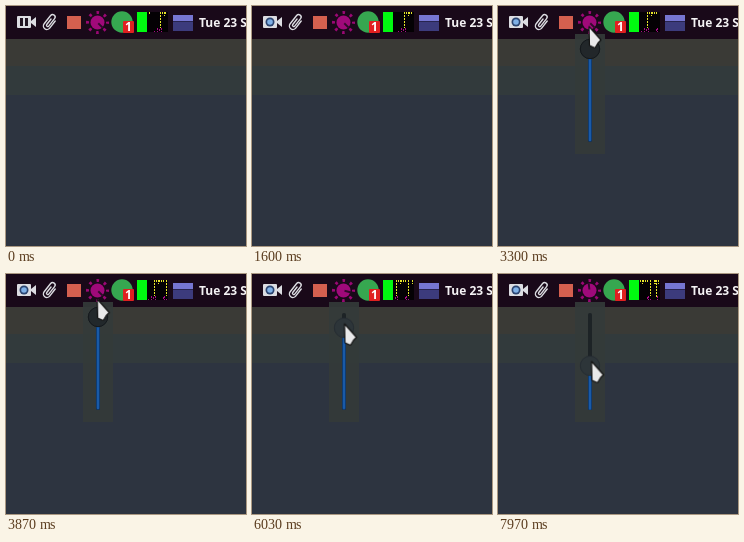
These frames come from a looping animation (240x240 px, 8000 ms). An HTML page:

```html
<!DOCTYPE html>
<html lang="en">
<head>
<meta charset="utf-8">
<title>Panel brightness slider</title>
<style>
html, body { margin: 0; width: 100%; height: 100%; overflow: hidden; background: #2d3440; }
svg { display: block; width: 100vw; height: 100vh; }
.cursor, .knob, .fill, .popup, .paused, .lens, .needle, .idle, .hover { animation: 8s linear infinite; }
.clock { font: 700 12px "Open Sans", sans-serif; fill: #f4f2f4; }
.badge { font: 700 12px "Open Sans", sans-serif; fill: #fff; text-anchor: middle; }

.paused { animation-name: paused; animation-timing-function: step-end; }
@keyframes paused { 0% { opacity: 1 } .375%, 100% { opacity: 0 } }
.lens { animation-name: lens; animation-timing-function: step-end; }
@keyframes lens { 0% { opacity: 0 } .375%, 100% { opacity: 1 } }

.cursor { animation-name: cursor; }
@keyframes cursor {
  0%, 22.1% { transform: translate(5px, 90px); opacity: 0; }
  22.11% { transform: translate(5px, 90px); opacity: 1; animation-timing-function: ease-out; }
  27.125% { transform: translate(88.5px, 51.5px); opacity: 1; animation-timing-function: ease-in-out; }
  30% { transform: translate(90px, 26px); }
  32.875%, 45% { transform: translate(91px, 20.5px); animation-timing-function: ease-in-out; }
  55%, 59.1% { transform: translate(92px, 39.5px); }
  60.4%, 62.5% { transform: translate(92px, 39px); }
  72.5% { transform: translate(92.5px, 47px); }
  82.875% { transform: translate(92.5px, 57px); }
  86.625% { transform: translate(93.5px, 65px); }
  93.375% { transform: translate(93.5px, 84px); }
  100% { transform: translate(93.5px, 87.5px); opacity: 1; }
}

.popup { animation-name: popup; }
@keyframes popup { 0%, 34.6% { opacity: 0 } 37%, 100% { opacity: 1 } }

.knob { animation-name: knob; }
@keyframes knob {
  0%, 62.5% { transform: translateY(43px); }
  72.5% { transform: translateY(51px); }
  82.875% { transform: translateY(61px); }
  86.625% { transform: translateY(69px); }
  93.375% { transform: translateY(88px); }
  100% { transform: translateY(92px); }
}
.fill { animation-name: fill; transform-origin: 0 136px; }
@keyframes fill {
  0%, 62.5% { transform: scaleY(1); }
  72.5% { transform: scaleY(.914); }
  82.875% { transform: scaleY(.806); }
  86.625% { transform: scaleY(.72); }
  93.375% { transform: scaleY(.516); }
  100% { transform: scaleY(.473); }
}
.needle { animation-name: needle; }
@keyframes needle {
  0%, 62.5% { transform: rotate(135deg); }
  72.5% { transform: rotate(112deg); }
  82.875% { transform: rotate(83deg); }
  86.625% { transform: rotate(59deg); }
  93.375% { transform: rotate(4deg); }
  100% { transform: rotate(-7deg); }
}
.idle { animation-name: idle; }
@keyframes idle { 0%, 48% { opacity: 1 } 54%, 100% { opacity: 0 } }
.hover { animation-name: hover; }
@keyframes hover { 0%, 62.5% { fill: #323a3c } 66%, 100% { fill: #2d3539 } }
</style>
</head>
<body>
<svg viewBox="0 0 240 240" preserveAspectRatio="none">
  <path d="M0 0H240V240H0Z" fill="#2d3440"/>
  <path d="M0 33H240V60H0Z" fill="#3a3a36"/>
  <path d="M0 60H240V89H0Z" fill="#323a3c"/>
  <path d="M0 0H240V33H0Z" fill="#190919"/>

  <!-- camera -->
  <path d="M25 15L30 11V21L25 17Z" fill="#dcdde2"/>
  <rect x="11" y="10" width="14" height="12" rx="1" fill="#dcdde2"/>
  <path class="paused" d="M14 12H17V20H14ZM19 12H22V20H19Z" fill="#211522"/>
  <g class="lens">
    <circle cx="18" cy="16" r="4.5" fill="#2b4470"/>
    <circle cx="18" cy="16" r="2.8" fill="#7fb0e6"/>
  </g>

  <!-- paper clip -->
  <path transform="translate(44 16) rotate(38)" fill="none" stroke="#dcdde2" stroke-width="1.4" stroke-linecap="round"
    d="M3.5-4V5A3.5 3.5 0 0 1-3.5 5V-5.5A2.5 2.5 0 0 1 1.5-5.5V4A1 1 0 0 1-1 4V-3"/>

  <rect x="61" y="10" width="14" height="13" fill="#d4604f"/>

  <!-- brightness dial, its needle follows the slider -->
  <g transform="translate(91.5 16.5)">
    <circle r="10" fill="none" stroke="#9a0874" stroke-width="3" stroke-dasharray="2.6 5.254" stroke-dashoffset="1.3"/>
    <circle r="7" fill="#a0097a"/>
    <path class="needle" d="M-1-7.2H1L.8-1H-.8Z" fill="#240a22"/>
  </g>

  <circle cx="116" cy="16" r="10.7" fill="#36a750"/>
  <rect x="117" y="15" width="11" height="12" rx="1" fill="#e02020"/>
  <text class="badge" x="122.5" y="25.4">1</text>

  <path d="M131 6H141V26H131Z" fill="#00fa10"/>
  <path d="M141 6H162V26H141Z" fill="#040104"/>
  <g id="graph" fill="none" stroke-dasharray="2 1">
    <path stroke="#e8e62a"/><path stroke="#a80b86"/><path stroke="#f2eee6"/>
  </g>

  <path d="M167 9H187V25H167Z" fill="#3c3b7c"/>
  <path d="M167 9H187V15H167Z" fill="#7676d2"/>
  <path d="M167 15H187V16H167Z" fill="#28244f"/>
  <text class="clock" x="193" y="21">Tue 23 Sep</text>

  <g class="popup">
    <path d="M77 28H107V148H77Z" fill="#343b3a" opacity=".93"/>
    <rect x="90" y="39" width="4" height="97" rx="2" fill="#1d2326"/>
    <g class="fill">
      <rect x="90" y="39" width="4" height="97" rx="2" fill="#0f3b71"/>
      <rect x="91" y="39" width="2" height="96" fill="#195aa8"/>
    </g>
    <g class="knob">
      <circle class="hover" cx="92" r="9.7" stroke="#262d33"/>
      <circle class="idle" cx="92" r="9.7" fill="#22272a" stroke="#14181b"/>
    </g>
  </g>

  <path class="cursor" d="M0 0L12 13.5L9 16.5L6 21.5L.5 19Z" fill="#e9e9ea" stroke="#141414" stroke-width="1.2" stroke-linejoin="round"/>
</svg>
<script>
const [yellow, magenta, white] = document.querySelectorAll('#graph path');
const LOOP = 8000, STEP = 560, COLUMNS = 19;

const random = seed => {
  const value = Math.sin(seed * 127.1 + 311.7) * 43758.5453;
  return value - Math.floor(value);
};
const line = (x, y, height) => `M${x + .5} ${y}v${height}`;

// Load history scrolling one column to the left per step.
function drawGraph(step) {
  let top = '', bottom = '', spikes = '';
  for (let i = 0; i < COLUMNS; i++) {
    const id = i + step, x = 142 + i, kind = random(id);
    const size = Math.floor(random(id + 50) * 4);
    if (kind < .2) top += line(x, 6, 1 + size);
    else if (kind < .3) top += line(x, 6, 16 + size);
    else if (kind < .38) spikes += line(x, 6, 16 + size);
    if (random(id + 90) < .25) bottom += line(x, 25 - size, 1 + size);
  }
  yellow.setAttribute('d', top);
  magenta.setAttribute('d', bottom);
  white.setAttribute('d', spikes);
}

let shown = -1;
function tick() {
  const step = Math.floor(performance.now() % LOOP / STEP);
  if (step !== shown) drawGraph(shown = step);
  requestAnimationFrame(tick);
}
tick();
</script>
</body>
</html>
```
